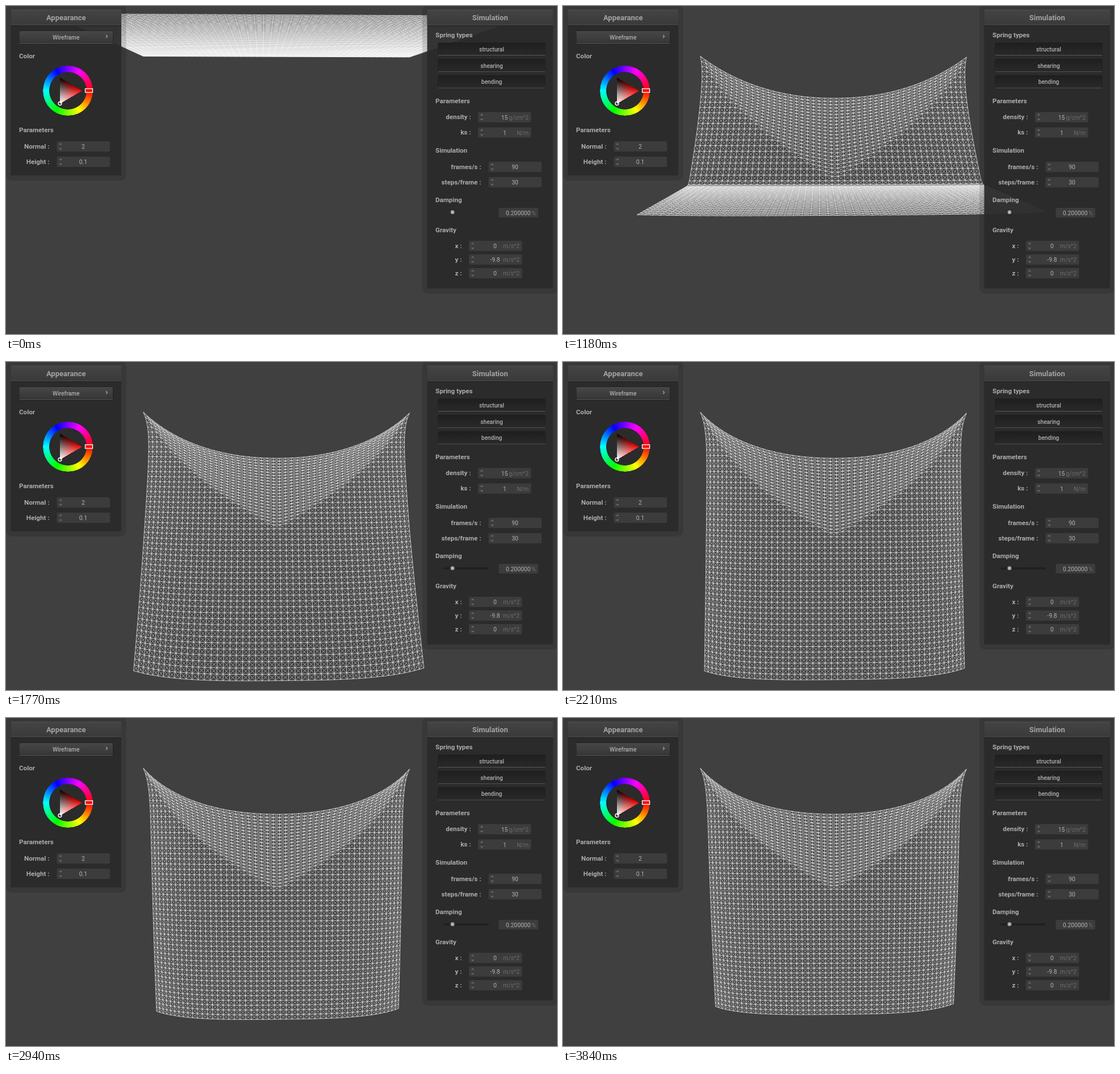
An HTML page with a canvas that plays this animation: 970 by 577 pixels, repeating every 3.94 s.

```html
<!DOCTYPE html>
<html lang="en">
<head>
<meta charset="utf-8">
<title>Cloth simulation</title>
<style>
  html, body { margin: 0; width: 970px; height: 577px; overflow: hidden; background: #404040; }
  canvas, svg { position: absolute; left: 0; top: 0; display: block; }
  text { font-family: Roboto, "Noto Sans", sans-serif; font-size: 10.4px; fill: #b2b2b2; }
  .title { font-weight: 700; font-size: 13px; fill: #a3a3a3; }
  .label { font-weight: 700; font-size: 11.6px; fill: #acacac; }
  .button { font-weight: 500; font-size: 10.2px; fill: #b0b0b0; }
  .unit { fill: #6c6c6c; }
  .wheel {
    position: absolute; left: 65px; top: 105px; width: 87.5px; height: 87.5px; border-radius: 50%;
    background: conic-gradient(from 90deg, #f00, #ff0, #0f0, #0ff, #00f, #f0f, #f00);
    -webkit-mask: radial-gradient(circle, transparent 32.5px, #000 33.3px);
    mask: radial-gradient(circle, transparent 32.5px, #000 33.3px);
  }
  .shade {
    position: absolute; left: 95px; top: 126px; width: 39px; height: 46px;
    clip-path: polygon(0 0, 100% 50%, 0 100%);
    background: linear-gradient(90deg, rgba(255, 0, 0, 0), #f00),
                conic-gradient(from 239.5deg at 100% 50%, #fff 0deg, #000 61deg);
  }
</style>
</head>
<body>
<canvas id="cloth" width="970" height="577"></canvas>
<svg id="panels" width="970" height="577"></svg>
<div class="wheel"></div>
<div class="shade"></div>
<svg width="970" height="577">
  <rect x="139.5" y="145.5" width="13" height="6.5" fill="#f01010" stroke="#fff" stroke-width="1.3"/>
  <circle cx="95" cy="171.5" r="3" fill="none" stroke="#fff" stroke-width="1.4"/>
</svg>
<script>
const $ = id => document.getElementById(id);

// ---------- panels ----------
const text = (x, y, str, cls = '', anchor = 'middle') =>
  `<text x="${x}" y="${y}" class="${cls}" text-anchor="${anchor}">${str}</text>`;
const rect = (x, y, w, h, fill, extra = '') =>
  `<rect x="${x}" y="${y}" width="${w}" height="${h}" fill="${fill}" ${extra}/>`;
const heading = (x, y, str) => text(x, y + 4.2, str, 'label', 'start');
const caption = (x, y, str) => text(x, y + 4.2, str, 'label', 'end');

function panel(x, w, h, title) {
  return rect(x - 8.5, -3, w + 17, h + 16, '#000', 'rx="10" opacity=".13"') +
    rect(x, 6, w, h - 2, '#2b2b2b', 'rx="2" opacity=".93"') +
    rect(x, 6.5, w, 27, 'url(#head)', 'rx="2"') +
    rect(x, 6.5, w, 1, '#515151') + rect(x, 33, w, 1, '#4b4b4b') + rect(x, 34, w, 1.2, '#202020') +
    text(x + w / 2, 24.7, title, 'title');
}

function button(x, y, w, h, label, fill) {
  return rect(x - .5, y - .5, w + 1, h + 1, '#1a1a1a', 'rx="2"') +
    rect(x, y + h - .5, w, 1, '#5e5e5e') +
    rect(x, y, w, h - 1, `url(#${fill})`, 'rx="1"') +
    text(x + w / 2, y + h / 2 + 4, label, 'button');
}

function field(x, cy, value, at, unit = '', end = 0) {
  const chevrons = `<path d="M${x + 4.5} ${cy - 3}l2-2 2 2M${x + 4.5} ${cy + 3}l2 2 2-2" fill="none" stroke="#7a7a7a" stroke-width="1.1"/>`;
  return rect(x, cy - 9, 93.5, 18, '#3c3c3c', 'rx="2.5"') + chevrons +
    text(at, cy + 4, value) + (unit && text(end, cy + 4, unit, 'unit', 'end'));
}

const grad = (id, a, b) =>
  `<linearGradient id="${id}" x1="0" y1="0" x2="0" y2="1"><stop stop-color="${a}"/><stop offset="1" stop-color="${b}"/></linearGradient>`;

$('panels').innerHTML =
  `<defs>${grad('head', '#444', '#3a3a3a')}${grad('up', '#474747', '#373737')}${grad('down', '#1f1f1f', '#292929')}</defs>` +
  panel(8.5, 194.5, 294, 'Appearance') +
  button(23.5, 44, 164.5, 21.5, 'Wireframe', 'up') +
  '<path d="M176 51.2l2.4 2.4-2.4 2.4" fill="none" stroke="#b0b0b0" stroke-width="1.2"/>' +
  heading(23, 87.5, 'Color') + heading(23, 218, 'Parameters') +
  caption(76.5, 247, 'Normal :') + field(89.5, 247, '2', 136) +
  caption(76.5, 274, 'Height :') + field(89.5, 274, '0.1', 136) +

  panel(741.5, 221.5, 493, 'Simulation') +
  heading(756, 51, 'Spring types') +
  ['structural', 'shearing', 'bending'].map((s, i) => button(761, 65 + i * 28.8, 188, 21.5, s, 'down')).join('') +
  heading(756, 166.5, 'Parameters') +
  caption(818.5, 195, 'density :') + field(831, 195.5, '15', 877.5, 'g/cm^2', 920) +
  caption(818.5, 222, 'ks :') + field(831, 222.5, '1', 878, 'N/m', 920) +
  heading(756, 253.5, 'Simulation') +
  caption(836.5, 282.5, 'frames/s :') + field(849.5, 283, '90', 896) +
  caption(836.5, 309.5, 'steps/frame :') + field(849.5, 310, '30', 896) +
  heading(756, 341, 'Damping') +
  rect(770, 361, 80, 4, '#202020', 'rx="2" id="track"') +
  '<circle cx="786" cy="362.7" r="5.2" fill="#1f1f1f"/><circle cx="786" cy="362.7" r="4.6" fill="#454545"/>' +
  '<circle cx="786" cy="362.7" r="3" fill="#b4b4b4"/>' +
  rect(867.5, 355, 69.5, 17, '#3c3c3c', 'rx="2.5"') +
  text(923.5, 367.5, '0.200000', '', 'end') + text(932.5, 367.5, '%', 'unit', 'end') +
  heading(756, 393.5, 'Gravity') +
  [['x', '0'], ['y', '-9.8'], ['z', '0']].map(([axis, v], i) =>
    caption(802.5, 421.7 + i * 24, axis + ' :') + field(815, 422 + i * 24, v, 861, 'm/s^2', 904)).join('');

// ---------- cloth ----------
const COUNT = 50, LAST = COUNT - 1;
const FOCUS = 1051, HORIZON = 288, MID = 476, PIN_W = 234;

// Angle of the free edge below the horizontal, in degrees, at a few steps
const swing = [[0, 0], [1, .6], [3, 6], [5, 15.3], [7, 28.3], [8, 37.6], [11, 72.7], [13, 83.3], [17, 96.3], [25, 100]];

const clamp = x => Math.min(1, Math.max(0, x));
const ease = x => { const s = clamp(x); return s * s * (3 - 2 * s); };
const smoothMin = (a, b, r) => Math.min(a, b) - Math.max(0, r - Math.abs(a - b)) ** 2 / (4 * r);

// Smooth curve through unevenly spaced points
function curve(pts, x) {
  const end = pts.length - 1;
  let i = 0;
  while (i < end - 1 && x > pts[i + 1][0]) i++;
  const slope = k => {
    const [x0, y0] = pts[Math.max(0, k - 1)], [x1, y1] = pts[Math.min(end, k + 1)];
    return (y1 - y0) / (x1 - x0);
  };
  const [x0, y0] = pts[i], [x1, y1] = pts[i + 1];
  const h = x1 - x0, s = (x - x0) / h, r = 1 - s;
  return r * r * (1 + 2 * s) * y0 + s * r * r * h * slope(i) +
    s * s * (3 - 2 * s) * y1 - s * s * r * h * slope(i + 1);
}

// A flat falling sheet meets a curtain hung from two corners:
// each point is as low as the lesser of the two allows.
function mesh(step) {
  const angle = curve(swing, step) * Math.PI / 180;
  const hung = ease((step - 3) / 8), taut = hung ** 3;
  const reach = 1 - .08 * Math.exp(-(((step - 9) / 2.5) ** 2)) - .02 * hung;
  const front = reach * Math.cos(angle), fall = reach * Math.sin(angle);
  const slope = 1 + (fall - 1) * taut;
  const bend = 1 + .5 * clamp((step - 3) / 4);
  const sag = .14 + .03 * hung;
  const bulge = .18 * clamp((step - 3) / 12);
  const tilt = Math.max(-5, 4 - 1.3 * step);
  const round = .1 * fall * (1 - hung) + 1e-6;

  const point = (u, v) => {
    const a = Math.abs(u);
    const fold = .47 * Math.max(.01, (1 - a) ** .7);
    const hang = slope * v + sag * (1 - a ** 2.1) * Math.max(0, 1 - v / fold);
    const drop = smoothMin(hang, fall, round) + .04 * taut * v * v * (1 - a ** 3);
    const ahead = front * v ** bend;
    const depth = 2.2436 - .9936 * ahead;
    const rise = .4245 - .1006 * ahead - .995 * drop;
    const sideDrop = Math.min(slope * v, fall);
    const pinch = 12 * hung * (1 - Math.exp(-v / .06)) * (1 - v);
    const width = FOCUS / 2 / (depth + .1 * sideDrop) - pinch;
    return [
      MID + 2 * v + .1 * Math.max(0, width - PIN_W) + width * (u + bulge * (u - u ** 3)),
      HORIZON - FOCUS * rise / (depth + .1 * drop) + u * (1.5 + (tilt - 1.5) * v) / 2
    ];
  };
  return Array.from({ length: COUNT }, (_, j) =>
    Array.from({ length: COUNT }, (_, i) => point(i / LAST * 2 - 1, j / LAST)));
}

const ctx = $('cloth').getContext('2d');
ctx.strokeStyle = '#fff';

function strand(pts, width) {
  ctx.lineWidth = width;
  ctx.beginPath();
  pts.forEach(([x, y]) => ctx.lineTo(x, y));
  ctx.stroke();
}

function draw(step) {
  const rows = mesh(step);
  ctx.clearRect(0, 0, 970, 577);
  for (let k = 0; k < COUNT; k++) {
    strand(rows[k], .7);
    strand(rows.map(r => r[k]), .7);
  }
  // both families of diagonals
  for (let k = 1 - LAST; k < LAST; k++) {
    strand(rows.map((r, j) => r[j + k]).filter(Boolean), .5);
    strand(rows.map((r, j) => r[LAST - j - k]).filter(Boolean), .5);
  }
  $('track').style.visibility = step >= 9 ? 'visible' : 'hidden';
}

// ---------- timing ----------
const LOOP = 3940, FIRST = 294, STEP = 147.2;
const begin = performance.now();
let shown = -1;

function tick() {
  const t = (performance.now() - begin) % LOOP;
  const step = Math.max(0, Math.floor((t - FIRST) / STEP) + 1);
  if (step !== shown) draw(shown = step);
  requestAnimationFrame(tick);
}
tick();
</script>
</body>
</html>
```
